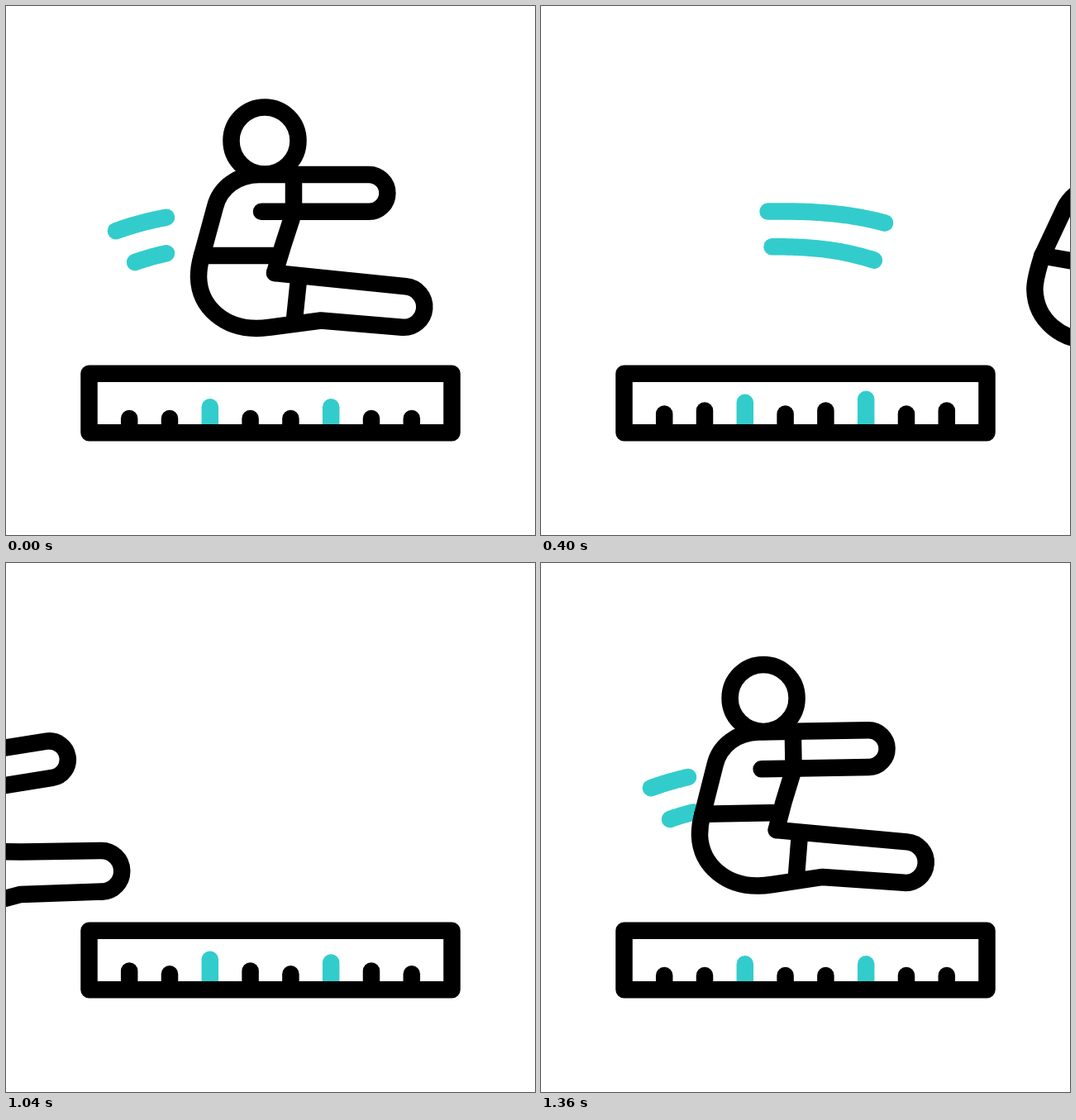
Animation of 640x640 px, one loop 1400 ms. Source, as an HTML page with a canvas:

```html
<!DOCTYPE html>
<html lang="en">
<head>
<meta charset="utf-8">
<title>Long jump</title>
<style>
  html, body { margin: 0; width: 100%; height: 100%; overflow: hidden; background: #fff; }
  canvas { display: block; width: 640px; height: 640px; }
</style>
</head>
<body>
<canvas id="stage" width="640" height="640"></canvas>
<script>
const ctx = document.getElementById('stage').getContext('2d');
const LOOP = 1400, STEP = 40, INK = '#000', TEAL = '#33cccc';
const HIP = [325, 323], NECK = [313, 204], SHOULDER = [348, 226];
const KNEE = [384.5, 355], HEM = [351.5, 355];

const rad = deg => deg * Math.PI / 180;
const clamp = v => Math.min(1, Math.max(0, v));
const smooth = v => (1 - Math.cos(Math.PI * clamp(v))) / 2;

function rotate([x, y], [cx, cy], deg) {
  const c = Math.cos(rad(deg)), s = Math.sin(rad(deg)), dx = x - cx, dy = y - cy;
  return [cx + dx * c - dy * s, cy + dx * s + dy * c];
}

function stroke(color, build) {
  ctx.strokeStyle = color;
  ctx.beginPath();
  build();
  ctx.stroke();
}

const move = p => ctx.moveTo(...p);
const line = (...points) => points.forEach(p => ctx.lineTo(...p));
const curve = (a, b, c) => ctx.bezierCurveTo(...a, ...b, ...c);

// Offset of the hip and joint angles in degrees; t = 0 is the upright pose mid-flight
function poseAt(t) {
  const rising = Math.min(t, 0), falling = Math.max(t, 0);
  return {
    dx: 1.028 * rising + 0.911 * falling,
    dy: 11.5 * Math.pow(-rising / 240, 2.2) + 0.000283 * falling ** 2 - 0.0756 * falling,
    torsoDeg: 0.025 * t,
    leanDeg: 0.015 * falling,
    pelvisDeg: 0.0205 * rising,
    shinDeg: 0.0185 * rising + 0.073 * falling,
    tuck: -0.02 * rising
  };
}

function drawJumper(t) {
  const { dx, dy, torsoDeg, leanDeg, pelvisDeg, shinDeg, tuck } = poseAt(t);
  const torso = (x, y) => rotate([x, y], HIP, torsoDeg);
  const arm = (x, y) => torso(...rotate([x, y], SHOULDER, leanDeg));
  const pelvis = (x, y) => rotate([x, y], HIP, pelvisDeg);
  const shin = (x, y) => pelvis(...rotate([x, y], KNEE, shinDeg - pelvisDeg));
  const hem = (x, y) => pelvis(...rotate([x, y], HEM, 0.6 * torsoDeg));
  const waist = torso(237, 302);
  const crotch = [HIP[0] + tuck, HIP[1] - tuck * 0.3];

  ctx.save();
  ctx.translate(dx, dy);

  stroke(INK, () => ctx.arc(...torso(...rotate([313, 163], NECK, leanDeg)), 40.5, 0, 7));

  // Back, shoulder and arm
  stroke(INK, () => {
    const turn = rad(torsoDeg + leanDeg);
    move(waist);
    line(torso(253, 243));
    curve(torso(259, 219), torso(281, 204), torso(306, 204));
    line(torso(348, 204), arm(439, 204));
    ctx.arc(...arm(439, 226.4), 22.4, turn - Math.PI / 2, turn + Math.PI / 2);
    line(arm(309, 248.8));
  });

  // Chest and waistband
  stroke(INK, () => {
    move(torso(348, 204));
    line(torso(348, 250), torso(335, 290), crotch);
    move(waist);
    line(torso(331, 302));
  });

  // Seat and legs
  stroke(INK, () => {
    const turn = rad(shinDeg + 5);
    move(waist);
    curve(pelvis(234, 312), pelvis(233, 320), pelvis(233, 328));
    curve(pelvis(234, 366), pelvis(266, 390), pelvis(303, 390));
    curve(pelvis(309, 390), pelvis(314, 389.5), pelvis(320, 388.7));
    line(pelvis(381, 380.5), shin(479.4, 388.7));
    ctx.arc(...shin(481.5, 364), 24.8, turn + Math.PI / 2, turn - Math.PI / 2, true);
    line(pelvis(388, 329.5), crotch);
    move(hem(354, 331));
    line(hem(349, 379));
  });
  ctx.restore();
}

// A speed line grows from x along an arc, then its tail catches up
function drawTrail(t, x, peakX, peakY, rise, slow, fast) {
  const s = Math.min(t, 360);
  const end = 194 + (t < 0 ? slow * t : fast * (s - 0.000575 * s * s));
  const start = x + (end - x) * smooth((t - 280) / 240);
  if (end - start < 0.5) return;
  stroke(TEAL, () => {
    for (let i = 0; i <= 40; i++) {
      const px = start + (end - start) * i / 40;
      line([px, peakY + rise * Math.pow(Math.abs(px - peakX) / (peakX - x), 2.4)]);
    }
  });
}

function drawRuler(t) {
  for (let i = 0; i < 8; i++) {
    const x = 149.2 + i * 48.8, long = i % 3 === 2;
    const late = long ? i < 4 : i % 3 === 0;
    const peak = late ? 720 : 600;
    const top = (long ? 485.3 : 499) - 13 * smooth(1 - Math.abs(t - peak) / 580);
    stroke(long ? TEAL : INK, () => { move([x, top]); line([x, 514]); });
  }
  stroke(INK, () => ctx.rect(100.5, 444.8, 439, 71.5));
}

function draw() {
  const t = Math.floor(performance.now() % LOOP / STEP) * STEP;
  const flight = t < LOOP / 2 ? t : t - LOOP;
  ctx.fillStyle = '#fff';
  ctx.fillRect(0, 0, 640, 640);
  ctx.lineWidth = 20.5;
  ctx.lineCap = ctx.lineJoin = 'round';
  drawTrail(flight, 133, 290, 248.5, 23.7, 0.4, 0.778);
  drawTrail(flight, 156, 283, 291.3, 18.7, 0.25, 0.732);
  drawRuler(t);
  drawJumper(flight);
  requestAnimationFrame(draw);
}
draw();
</script>
</body>
</html>
```
